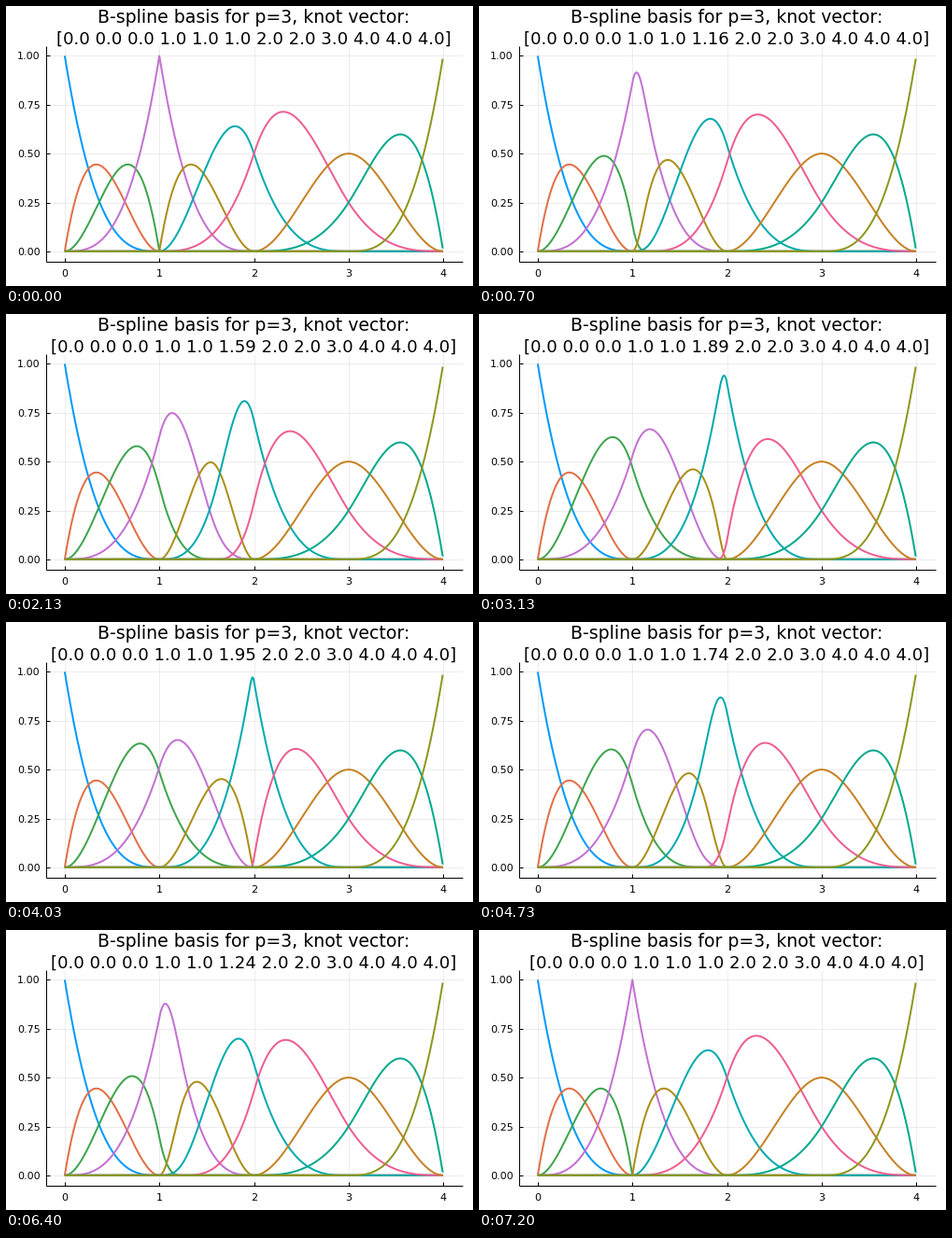
Animation of 500 by 300 pixels, one loop 7.41 s. Source, as a matplotlib script:

```python
import numpy as np
import matplotlib.pyplot as plt
from matplotlib.animation import FuncAnimation
from matplotlib.collections import LineCollection

W, H = 500, 300
LOOP, TICK = 7410, 15          # ms
RISE, FALL, STEP = 200, 3900, 100 / 3
DEGREE = 3
COLORS = ["#009afa", "#e36f47", "#3ea44e", "#c371d2", "#ac8e18",
          "#00aaae", "#ed5e93", "#c68225", "#00a98d", "#8e971e"]

plt.rcParams["font.family"] = "DejaVu Sans"


def px(x):
    return 62.9 + 101.3 * x


def py(y):
    return 262.9 - 209.5 * y


def knots(k):
    return [0.0] * 4 + [1.0, 1.0, k, 2.0, 2.0, 3.0] + [4.0] * 4


def ramp(num, den):
    return num / den if den else 0 * num


def basis(t, x):
    """All cubic basis functions by the Cox-de Boor recursion."""
    b = [((x >= lo) & (x < hi)).astype(float) for lo, hi in zip(t, t[1:])]
    for p in range(1, DEGREE + 1):
        b = [ramp(x - t[i], t[i + p] - t[i]) * b[i]
             + ramp(t[i + p + 1] - x, t[i + p + 1] - t[i + 1]) * b[i + 1]
             for i in range(len(b) - 1)]
    return b


def steps_since(t, start):
    return int(np.clip((t - start + 5) // STEP + 1, 0, 100))


def moving_knot(t):
    n = steps_since(t, RISE) - steps_since(t, FALL)
    return round(1 + n / 100, 2)


fig = plt.figure(figsize=(W / 72, H / 72), dpi=72, facecolor="white")
ax = fig.add_axes([0, 0, 1, 1])
ax.set(xlim=(0, W), ylim=(H, 0))
ax.axis("off")

left, right, top, bottom = 42.5, 488.5, 43, 273.5
grid, axes = [], [[(left, top), (left, bottom)], [(left, bottom), (right, bottom)]]
for v in range(5):
    x, y = px(v), py(v / 4)
    grid += [[(x, top), (x, bottom)], [(left, y), (right, y)]]
    axes += [[(x, bottom), (x, bottom - 4)], [(left, y), (left + 4, y)]]
    ax.text(x, 289.5, str(v), size=11.1, ha="center", va="baseline")
    ax.text(36.7, y + 4, f"{v / 4:.2f}", size=11.1, ha="right", va="baseline")
ax.add_collection(LineCollection(grid, colors="black", alpha=0.1, linewidths=0.7))
ax.add_collection(LineCollection(axes, colors="black", linewidths=1))

ax.text(265.5, 18, "B-spline basis for p=3, knot vector:", size=18.9,
        ha="center", va="baseline")
vector = ax.text(265.5, 41, "", size=18.1, ha="center", va="baseline")

xs = np.arange(800) / 200
curves = [ax.plot(px(xs), py(0 * xs), color=c, lw=2, solid_capstyle="butt")[0]
          for c in COLORS]


def draw(i):
    t = (i * TICK + 10) // 10 * 10
    kv = knots(moving_knot(t))
    vector.set_text("[" + " ".join(map(str, kv[1:-1])) + "]")
    for curve, values in zip(curves, basis(kv, xs)):
        curve.set_ydata(py(values))
    return [vector, *curves]


anim = FuncAnimation(fig, draw, frames=LOOP // TICK, interval=TICK,
                     repeat=True, repeat_delay=0)
plt.show()
```
